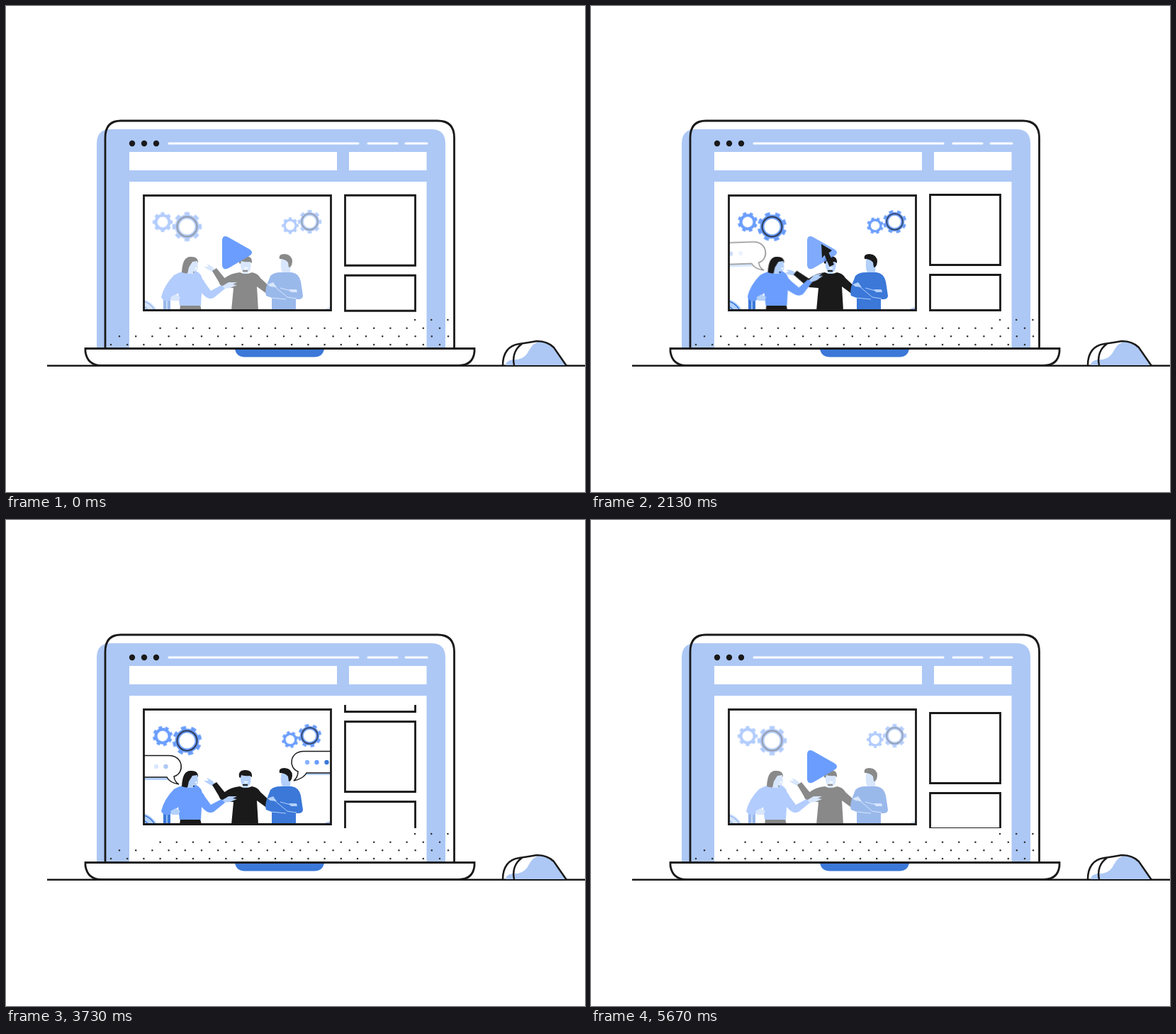
An HTML page without scripts for the animation above (5.73 s loop, 817x686 px).

```html
<!DOCTYPE html>
<html lang="en">
<head>
<meta charset="utf-8">
<title>Laptop video</title>
<style>
html, body { margin: 0; width: 100%; height: 100%; overflow: hidden; background: #fff; }
svg { display: block; width: 817px; height: 686px; }
.ink { fill: #1a1a1a; }
.line { fill: none; stroke: #1a1a1a; stroke-width: 2.8; }
.thin { fill: none; stroke: #1a1a1a; stroke-width: 1.5; }
.pale { fill: #adc8f5; }
.mid { fill: #6a9dfd; }
.deep { fill: #3b78d8; }
.skin { fill: #b3d0fb; }
.white { fill: #fff; }
.a { animation: 5.73s linear infinite; }

.cx { animation-name: cx; }
.cy { animation-name: cy; }
.show { animation-name: show; }
@keyframes cx {
  0%, .52% { transform: translateX(199px); animation-timing-function: cubic-bezier(.4,0,.28,1); }
  16.2%, 44.1% { transform: none; animation-timing-function: ease-in; }
  49.4%, 100% { transform: translateX(199px); }
}
@keyframes cy {
  0%, .52% { transform: translateY(114px); animation-timing-function: cubic-bezier(.37,0,.63,1); }
  16.2%, 44.1% { transform: none; animation-timing-function: ease-in; }
  49.4%, 100% { transform: translateY(60px); }
}
@keyframes show { 0%, .51% { opacity: 0; } .52%, 46.5% { opacity: 1; } 49.4%, 100% { opacity: 0; } }

.veil { animation-name: veil; }
@keyframes veil { 0%, 23.2% { opacity: .49; } 32.6%, 66.8% { opacity: 0; } 73.8%, 100% { opacity: .49; } }
.play { animation-name: play; }
@keyframes play { 0%, 36.1% { opacity: 1; } 43.6%, 66.8% { opacity: 0; } 73.8%, 100% { opacity: 1; } }

.spin { animation-name: spin; }
@keyframes spin { 0%, 23.2% { transform: none; } 73.8%, 100% { transform: rotate(90deg); } }

.sway { animation-name: sway; animation-timing-function: ease-in-out; }
@keyframes sway {
  0%, 30% { transform: none; }
  37.2% { transform: translateX(1.5px); }
  48%, 54.6% { transform: translateX(5px); }
  63%, 100% { transform: none; }
}
.reach { animation-name: reach; animation-timing-function: ease-in-out; transform-origin: 272px 388px; }
@keyframes reach { 0%, 25% { transform: none; } 36%, 39% { transform: rotate(-14deg); } 48%, 100% { transform: none; } }
.wave { animation-name: wave; animation-timing-function: ease-in-out; transform-origin: 305px 393px; }
@keyframes wave { 0%, 25% { transform: none; } 36%, 39% { transform: rotate(-18deg); } 48%, 100% { transform: none; } }

.talk1 { animation-name: talk1; transform-origin: 243px 373px; }
@keyframes talk1 {
  0%, 33.7% { opacity: 0; transform: rotate(-4deg); }
  40.7%, 66.8% { opacity: 1; transform: none; }
  72%, 100% { opacity: 0; transform: none; }
}
.talk2 { animation-name: talk2; transform-origin: 407px 368px; }
@keyframes talk2 {
  0%, 54.6% { opacity: 0; transform: rotate(4deg); }
  60%, 66.8% { opacity: 1; transform: none; }
  72%, 100% { opacity: 0; transform: none; }
}
.d1 { animation-name: d1; }
.d2 { animation-name: d2; }
.d3 { animation-name: d3; }
@keyframes d1 { 0%, 34% { opacity: 0; } 40%, 55% { opacity: 1; } 62%, 100% { opacity: 0; } }
@keyframes d2 { 0%, 34% { opacity: 0; } 46%, 58% { opacity: 1; } 66.5%, 100% { opacity: .1; } }
@keyframes d3 { 0%, 40% { opacity: 0; } 50%, 100% { opacity: 1; } }

.scroll { animation-name: scroll; }
@keyframes scroll {
  0%, 15.9% { transform: translateY(.7px); }
  16%, 56.58% { transform: none; animation-timing-function: cubic-bezier(.38,0,.68,1); }
  67.05%, 89.52% { transform: translateY(-176.3px); }
  89.53% { transform: translateY(.7px); animation-timing-function: cubic-bezier(.38,0,.68,1); }
  100% { transform: translateY(-176.3px); }
}
</style>
</head>
<body>
<svg viewBox="0 0 817 686">
  <defs>
    <clipPath id="video"><path d="M195 268H458V429H195Z"/></clipPath>
    <clipPath id="side"><path d="M476 261H580V435H476Z"/></clipPath>
    <g id="gear" fill="none" stroke="#6a9dfd">
      <circle r="14" stroke-width="6"/>
      <circle r="18" stroke-width="5.4" pathLength="16" stroke-dasharray="1 1" stroke-dashoffset=".5"/>
    </g>
    <g id="cards" class="line">
      <path d="M478.5 266.5H577.5V365.5H478.5ZM478.5 379.5H577.5V429.5H478.5Z"/>
    </g>
  </defs>

  <!-- laptop -->
  <path class="pale" d="M128 483V194Q128 174 148 174H600Q620 174 620 194V483Z"/>
  <path class="white" d="M174 248H593.500V483H174ZM174 206H467V232H174ZM484 206H593.500V232H484Z"/>
  <path d="M230 194H497M511 194H552M564 194H594" stroke="#fff" stroke-width="3" stroke-linecap="round"/>
  <g class="ink">
    <circle cx="178" cy="194" r="4.200"/><circle cx="195" cy="194" r="4.200"/><circle cx="212" cy="194" r="4.200"/>
  </g>
  <path class="line" d="M140 483V186Q140 162 162 162H609Q632.500 162 632.500 186V483" stroke-width="2.500"/>
  <path d="M577 443H626M217.600 454.700H614M160 466.300H626M148 478H614" fill="none" stroke="#333" stroke-width="2.600" stroke-linecap="round" stroke-dasharray="0 23.200"/>
  <path d="M58 507.800H817" class="line" style="stroke-width:2.500"/>
  <path d="M112 483.500H661V488Q659 507 639 507.500H134Q115 507 112 488Z" class="line" style="fill:#fff"/>
  <path class="deep" d="M323 485H449Q446 495.500 436 495.500H336Q326 495.500 323 485Z"/>

  <!-- mouse -->
  <path class="pale" d="M705 507Q706 498 722 499Q733 497 738 486Q744 475 753 474Q769 476 776 488L790 507Z"/>
  <path class="line" style="stroke-width:2.500" d="M701 507C701 490 709 479 724 477Q738 475 749 473Q764 473 773 482L791 508M717 507C714 494 719 483 728 477"/>

  <!-- side list -->
  <g clip-path="url(#side)">
    <g class="a scroll"><use href="#cards"/><use href="#cards" y="177"/></g>
  </g>

  <!-- video -->
  <g clip-path="url(#video)">
    <g transform="translate(221 305) scale(.68)"><use href="#gear" class="a spin"/></g>
    <g transform="translate(255.500 311.500)"><use href="#gear" class="a spin"/><circle class="thin" r="14"/></g>
    <g transform="translate(401 310) scale(.57)"><use href="#gear" class="a spin"/></g>
    <g transform="translate(428.500 304.500) scale(.8)"><use href="#gear" class="a spin"/><circle class="thin" r="14.200" stroke-width="1.900"/></g>

    <!-- plants -->
    <path class="skin" d="M194 414Q205 416 214 430H194Z"/>
    <path d="M195 417Q205 420 210 430M195 424L202 430" fill="none" stroke="#3b78d8" stroke-width="1.600"/>
    <path d="M447 430Q451 426 459 425V430Z" fill="#a9bdee"/>

    <!-- man, middle -->
    <path class="ink" d="M330 376Q338 380 347 376Q355 377 359 384L373 397L369 407L354 396L356 430H318L321 398L308 397L301 390L307 385Q317 377 330 376Z"/>
    <g class="a wave">
      <path class="skin" d="M296 374Q291 366 283 364L286 368L279 368L285 372Q290 375 294 376Z"/>
      <path class="ink" d="M291 374L297 370L310 386L308 397Q303 397 300 389Z"/>
    </g>
    <path class="skin" d="M331 360H345Q347 374 341 376V378H334V375Q330 370 331 360Z"/>
    <path class="ink" d="M329 363Q327 354 336 353Q348 352 347 363L344 361Q338 362 332 360L331 364ZM334 373H341V375H334Z"/>
    <path class="white" d="M335 369H342Q339 373 335 369Z"/>

    <!-- man, right -->
    <path class="deep" d="M387 376H403Q413 377 416 389L419 409Q419 414 412 414H409V430H375V412L367 409Q365 403 368 394L373 381Q378 376 387 376Z"/>
    <path class="skin" d="M388 361Q388 355 395 356L402 362L401 376H390Q387 371 388 361Z"/>
    <path class="ink" d="M386 357Q384 350 393 350Q404 351 404 361Q403 369 399 369L398 362Q394 357 386 357Z"/>
    <path class="skin" d="M369 393L377 390L382 397L373 396ZM399 400L410 400L411 404L402 404Z"/>
    <path d="M379 396L397 411L410 413M387 398L402 402M375 412L395 414" fill="none" stroke="#b3d0fb" stroke-width="1"/>

    <!-- woman -->
    <path class="deep" d="M222 412H232V430H222Z"/>
    <path d="M227 412V430" stroke="#b3d0fb" stroke-width="1.500"/>
    <g class="a sway">
      <path class="ink" d="M246 422H274L276 430H245Z"/>
      <path class="mid" d="M253 374H268Q277 378 277 388L275 423H245L243 405L231 416Q222 418 219 411Q223 394 237 380Q243 376 253 374Z"/>
      <path class="skin" d="M232 411L239 407L246 411L243 416H234Z"/>
      <g class="a reach">
        <path class="skin" d="M304 396L314 390L326 390L320 393L326 394L316 398L307 399Z"/>
        <path class="mid" d="M268 379Q276 381 281 391L289 402L304 394L309 399L293 412Q286 415 280 409L268 397Z"/>
      </g>
      <path class="ink" d="M248 376Q249 354 260 354Q271 353 271 362L266 366V376Q257 379 248 376Z"/>
      <path class="skin" d="M263 361L270 360L271 370Q270 375 264 375V378L256 378L258 369Z"/>
      <path class="white" d="M266 370L270 369L269 372Z"/>
    </g>

    <!-- speech -->
    <g class="a talk1">
      <path class="skin" d="M194 362H232L234 367H194Z"/>
      <path class="thin white" style="fill:#fff" d="M192 332.500H230C250 332.500 253 357 237 362Q238 370 244 373Q231 371 227 363H192"/>
      <circle class="a d1 deep" cx="198" cy="348" r="3.200"/>
      <circle class="a d2 mid" cx="212" cy="348" r="3.200"/>
      <circle class="a d3 pale" cx="225.500" cy="348" r="3.200"/>
    </g>
    <g class="a talk2">
      <path class="skin" d="M418 356H460V360H418Z"/>
      <path class="thin" style="fill:#fff" d="M461 326.500H420C400 326.500 398 350 412 355Q412 363 406 368Q420 365 424 357H461"/>
      <circle class="mid" cx="425" cy="342" r="3.200" opacity=".8"/>
      <circle class="mid" cx="438.500" cy="342" r="3.200"/>
      <circle class="deep" cx="452.500" cy="342" r="3.200"/>
    </g>

    <path class="a veil white" d="M194 267H459V430H194Z"/>
  </g>
  <path class="a play mid" d="M305 330Q306 323 313 326L343 343Q351 348 343 353L314 370Q306 374 305 366Z"/>
  <path class="line" d="M194.500 267.500H458.500V429.500H194.500Z"/>

  <!-- pointer -->
  <g class="a show"><g class="a cx"><g class="a cy">
    <path class="ink" d="M325 336L340 345L335.500 348.500L343 365L336.500 368L329.500 351.500L326 356Z"/>
  </g></g></g>
</svg>
</body>
</html>
```
